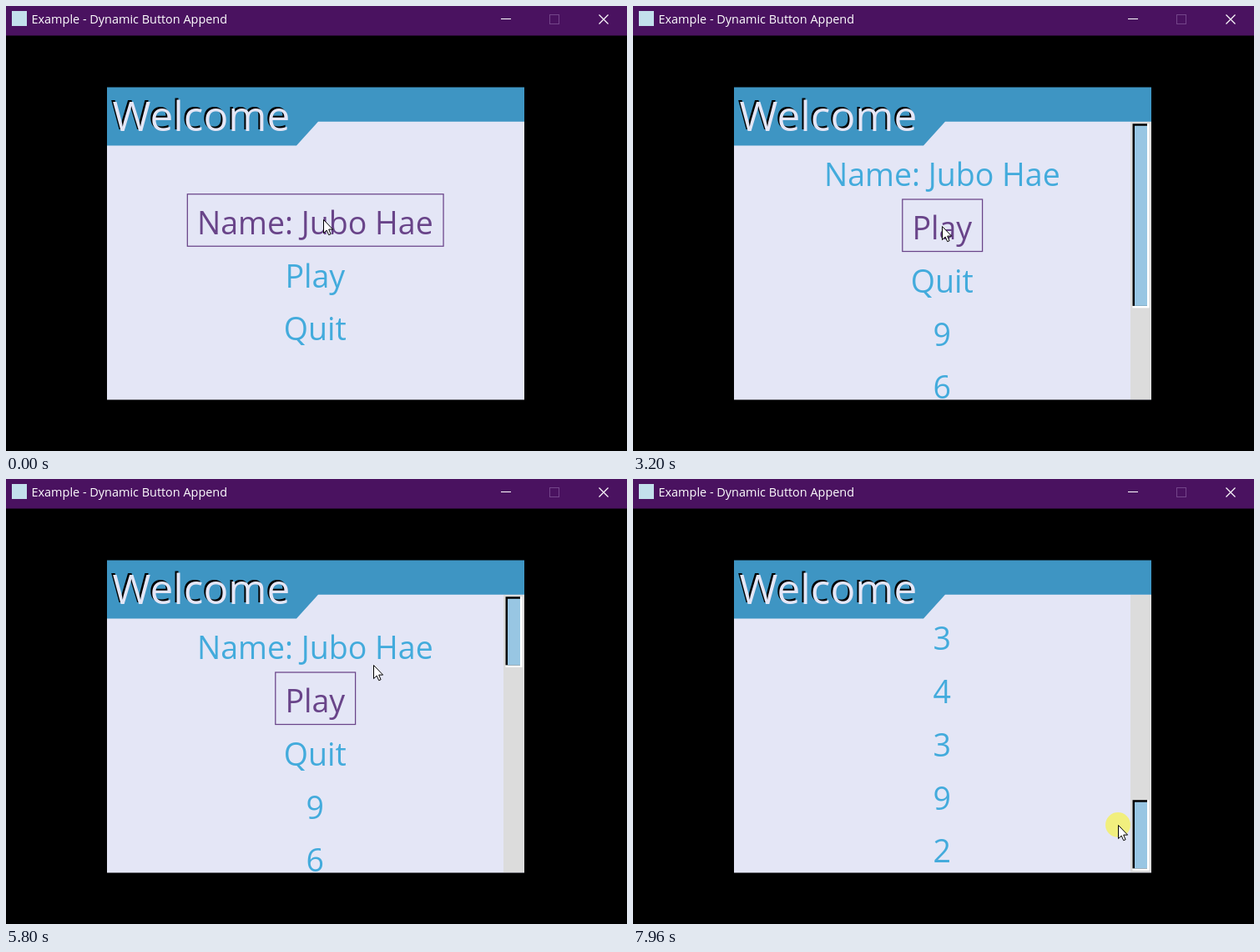
Write an HTML page with a canvas that moves like this. It is 744 px wide and 534 px high and loops after 8000 ms.

```html
<!DOCTYPE html>
<html lang="en">
<head>
<meta charset="utf-8">
<title>Dynamic Button Append</title>
<style>
  html, body { margin: 0; width: 744px; height: 534px; overflow: hidden; background: #000; }
  canvas { display: block; }
</style>
</head>
<body>
<canvas id="stage" width="744" height="534"></canvas>
<script>
const ctx = document.getElementById('stage').getContext('2d');
const LOOP = 8000, STEP = 40, ROW = 63.75, PX = 1.25;
const PANEL = '#e4e6f6', BLUE = '#3e95c3', ITEM = '#43abdc', PICKED = '#694489';
const labels = ['Name: Jubo Hae', 'Play', 'Quit', ...'966017582534392'];

// Each press lasts HOLD; its button appears at APPEND.
const HOLD = 80, APPEND = 120, DRAG = 6400;
const presses = [960, 1920, 2400, 2920, 3240, 3440, 3720, 4040, 4360, 4760];
for (let i = 1; i <= 5; i++) presses.push(4800 + i * 120);

// start, end, x, y
const moves = [
  [320, 640, 373, 314], [1360, 1440, 373, 296], [1760, 1840, 373, 288], [2240, 2320, 370, 264],
  [5480, 5800, 440, 223], [5800, 6360, 601, 178], [6440, 6960, 601, 220], [6960, 7960, 581, 415]
];

function pointerAt(t) {
  let x = 380, y = 256;
  for (const [start, end, toX, toY] of moves) {
    const p = Math.min(1, Math.max(0, (t - start) / (end - start)));
    x += (toX - x) * p;
    y += (toY - y) * p;
  }
  return [Math.round(x), Math.round(y)];
}

function rect(color, x, y, w, h) {
  ctx.fillStyle = color;
  ctx.fillRect(x, y, w, h);
}

function frame(color, width, x, y, w, h) {
  ctx.strokeStyle = color;
  ctx.lineWidth = width;
  ctx.strokeRect(x, y, w, h);
}

function text(str, x, y, size, color, align = 'left') {
  ctx.font = `${size}px "Open Sans", "Noto Sans", sans-serif`;
  ctx.textAlign = align;
  ctx.fillStyle = color;
  ctx.fillText(str, x, y);
}

function titleBar() {
  rect('#4a1260', 0, 0, 744, 35.5);
  rect('#c3e0ec', 7, 6, 18, 18);
  text('Example - Dynamic Button Append', 30.5, 21, 14.45, '#fff');
  rect('#fff', 593, 15, 12, 1);
  frame('#74458a', 1, 651.5, 10.5, 11, 11);
  ctx.strokeStyle = '#fff';
  ctx.lineWidth = 1.2;
  ctx.stroke(new Path2D('M710.5 10.5l11 11m0-11l-11 11'));
}

function items(count, shift, picked) {
  const first = Math.max(216.25, 273.75 - (count - 3) * 32.5);
  ctx.save();
  ctx.beginPath();
  ctx.rect(121, 167, 500, 305.5);
  ctx.clip();
  for (let i = 0; i < count; i++) {
    const y = first + i * ROW - shift, color = i === picked ? PICKED : ITEM;
    text(labels[i], 370.3, y, 30 * PX, color, 'center');
    if (i === picked) {
      const w = ctx.measureText(labels[i]).width + 24;
      frame(color, PX, 370.7 - w / 2, y - 48, w, 50 * PX);
    }
  }
  ctx.restore();
}

function header() {
  ctx.fillStyle = BLUE;
  ctx.fill(new Path2D('M121 97.5H621V138.75H374L348 167.5H121Z'));
  text('Welcome', 125.5, 148, 49.6, '#000');
  text('Welcome', 127.5, 150, 49.6, PANEL);
}

function scrollBar(count, offset) {
  const x = 598.5, y = 141.25 + offset, w = 20, h = 1508 / (count - 0.18), b = 2 * PX;
  rect('#dcdcdc', 596, 139, 25, 333);
  rect('#fff', x, y, w, h);
  rect('#000', x, y, w - b, h - b);
  rect('#98c6e3', x + b, y + b, w - 2 * b, h - 2 * b);
}

const arrow = new Path2D('M.5 .5V16.6L4.2 13.1 6.7 18.7 9.1 17.7 6.7 12.1H11.6Z');

function cursor(x, y, pressed) {
  ctx.save();
  ctx.translate(x, y);
  if (pressed) {
    ctx.fillStyle = 'rgba(245,242,85,.75)';
    ctx.beginPath();
    ctx.arc(0, 0, 15, 0, 7);
    ctx.fill();
  }
  ctx.fillStyle = '#fff';
  ctx.fill(arrow);
  ctx.strokeStyle = '#000';
  ctx.lineWidth = 1;
  ctx.stroke(arrow);
  ctx.restore();
}

function draw() {
  const t = Math.floor(performance.now() % LOOP / STEP) * STEP;
  const [x, y] = pointerAt(t);
  const count = 3 + presses.filter(p => t >= p + APPEND).length;
  const pressed = t >= DRAG || presses.some(p => t >= p && t < p + HOLD);
  const offset = t < DRAG ? 0 : Math.max(0, (y - 182) * 1.047);
  rect('#000', 0, 0, 744, 534);
  titleBar();
  rect(PANEL, 121, 98, 500, 374.5);
  items(count, offset * 3.442, t < presses[0] ? 0 : 1);
  header();
  if (count > 4) scrollBar(count, offset);
  cursor(x, y, pressed);
  requestAnimationFrame(draw);
}
draw();
</script>
</body>
</html>
```
